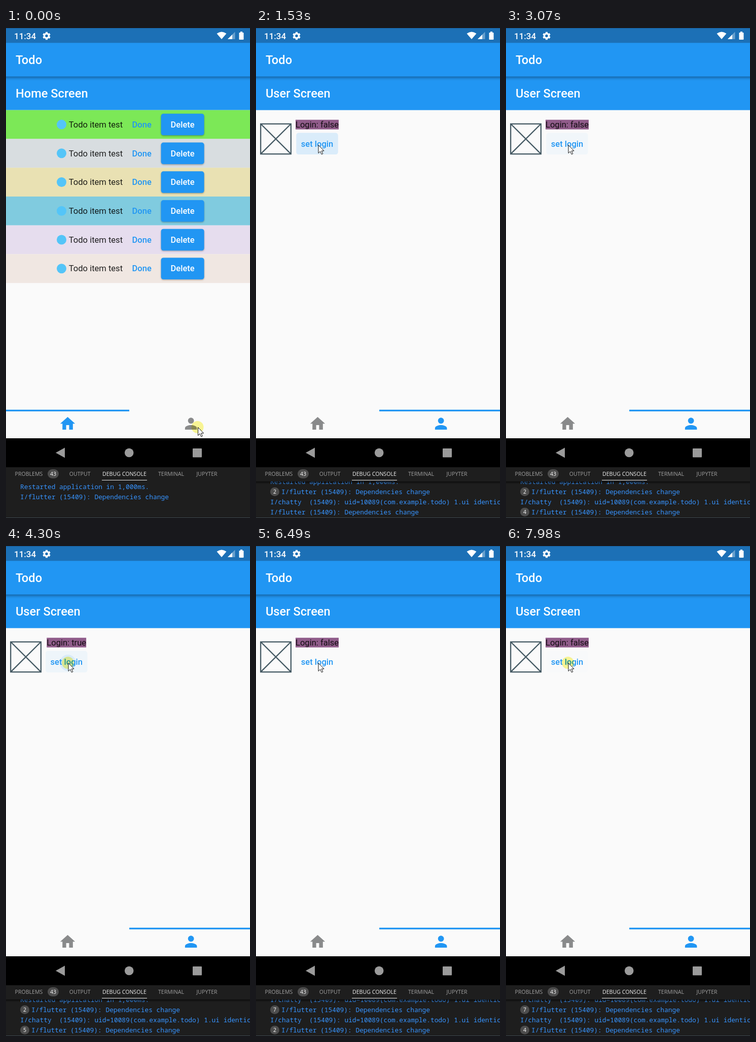
Write an HTML page with a canvas that moves like this. It is 481 px wide and 965 px high and loops after 8 s.

```html
<!DOCTYPE html>
<html lang="en">
<head>
<meta charset="utf-8">
<title>Todo</title>
<style>
html, body { margin: 0; width: 100%; height: 100%; overflow: hidden; background: #fafafa; }
canvas { display: block; width: 481px; height: 965px; }
</style>
</head>
<body>
<canvas id="stage" width="481" height="965"></canvas>
<script>
const ctx = document.getElementById('stage').getContext('2d');
const LOOP = 8000, W = 481, H = 965;
const BLUE = '#2196f3', PAGE = '#fafafa', INK = 'rgba(0,0,0,.87)';

// Device pixels per logical pixel of the phone screen.
const DP = 1.182;
const TITLE = `500 ${20 * DP}px Roboto, sans-serif`;
const BODY = `${14 * DP}px Roboto, sans-serif`;
const BUTTON = `500 ${14 * DP}px Roboto, sans-serif`;
const CLOCK = '500 17px Roboto, sans-serif';
const PANEL = '10.6px "Open Sans", sans-serif';
const MONO = '500 12.85px "Noto Sans Mono", monospace';

const rowColors = ['#7ce857', '#d8dde0', '#e9e1b3', '#80cbdf', '#e6ddee', '#f0e7e2'];
const presses = [1020, 1300, 1830, 2560, 3500, 4230, 4520, 5180, 5730, 5920, 6700, 7350, 7970];
const HOLD = 100;

// Times at which the last log line repeats, and at which a new block starts.
const repeats = [1180, 1900, 2200, 2990, 3650, 4500, 4850, 6250, 6900, 7600];
const blocks = [1500, 6060];

const homeIcon = new Path2D('M10 20v-6h4v6h5v-8h3L12 3 2 12h3v8z');
const personIcon = new Path2D('M12 12c2.21 0 4-1.79 4-4s-1.79-4-4-4-4 1.79-4 4 1.79 4 4 4zm0 2c-2.67 0-8 1.34-8 4v2h16v-2c0-2.66-5.33-4-8-4z');
const arrow = new Path2D('M.5 .5V16.5L4.2 13 6.8 18.8 9.3 17.7 6.8 12H11.6Z');

const clamp = v => Math.max(0, Math.min(1, v));
const span = (t, a, b) => clamp((t - a) / (b - a));
const ease = p => p * p * (3 - 2 * p);
const mix = (a, b, p) => a + (b - a) * p;
const blue = alpha => `rgba(33,150,243,${alpha})`;

function rect(x, y, w, h, color) {
  ctx.fillStyle = color;
  ctx.fillRect(x, y, w, h);
}

function round(x, y, w, h, r, color) {
  ctx.fillStyle = color;
  ctx.beginPath();
  ctx.roundRect(x, y, w, h, r);
  ctx.fill();
}

function disc(x, y, r, color) {
  ctx.fillStyle = color;
  ctx.beginPath();
  ctx.arc(x, y, r, 0, Math.PI * 2);
  ctx.fill();
}

function poly(color, ...pts) {
  ctx.fillStyle = color;
  ctx.beginPath();
  pts.forEach(([x, y]) => ctx.lineTo(x, y));
  ctx.fill();
}

function text(str, x, y, font, color, align = 'left') {
  ctx.font = font;
  ctx.fillStyle = color;
  ctx.textAlign = align;
  ctx.fillText(str, x, y);
}

function shadow(color, blur, dy) {
  ctx.shadowColor = color;
  ctx.shadowBlur = blur;
  ctx.shadowOffsetY = dy;
}

function scoped(draw) {
  ctx.save();
  draw();
  ctx.restore();
}

function clipTo(x, y, w, h, r = 0) {
  ctx.beginPath();
  ctx.roundRect(x, y, w, h, r);
  ctx.clip();
}

function gear(x, y) {
  scoped(() => {
    ctx.translate(x, y);
    ctx.strokeStyle = '#fff';
    ctx.lineWidth = 3.4;
    ctx.beginPath();
    ctx.arc(0, 0, 4.4, 0, Math.PI * 2);
    ctx.stroke();
    for (let i = 0; i < 6; i++) {
      rect(-2, -7.7, 4, 3.2, '#fff');
      ctx.rotate(Math.PI / 3);
    }
  });
}

function statusBar() {
  rect(0, 0, W, 29.3, '#1c70b6');
  rect(0, 0, W, 1, '#185a92');
  text('11:34', 16, 22, CLOCK, '#fff');
  gear(80, 15.5);
  ctx.fillStyle = '#fff';
  ctx.beginPath();
  ctx.moveTo(425, 22);
  ctx.lineTo(415.5, 11);
  ctx.quadraticCurveTo(425, 4, 434.5, 11);
  ctx.fill();
  poly('rgba(255,255,255,.35)', [437, 22], [451.5, 22], [451.5, 7.5]);
  poly('#fff', [437, 22], [446, 22], [446, 13]);
  round(459.5, 9, 9, 14, 1, '#fff');
  rect(462, 7, 4, 3, '#fff');
}

function appBar() {
  scoped(() => {
    shadow('rgba(0,0,0,.38)', 6, 2.2);
    rect(-10, 29, W + 20, 66.5, BLUE);
  });
  statusBar();
  text('Todo', 16 * DP, 71, TITLE, '#fff');
}

function pageTitle(str) {
  rect(0, 95, W, 66.7, BLUE);
  text(str, 16 * DP, 137, TITLE, '#fff');
}

function homePage() {
  rect(0, 95, W, 657, PAGE);
  pageTitle('Home Screen');
  rowColors.forEach((color, i) => {
    const top = 161.7 + i * 48 * DP, base = top + 34.1;
    rect(0, top, W, 48 * DP + 0.1, color);
    disc(109.5, top + 28.4, 9.5, '#54c5f8');
    text('Todo item test', 123.8, base, BODY, INK);
    text('Done', 267.7, base, BUTTON, BLUE, 'center');
    scoped(() => {
      shadow('rgba(0,0,0,.3)', 3, 1.3);
      round(305.6, top + 7.1, 85, 36 * DP, 4.7, BLUE);
    });
    text('Delete', 348.1, base, BUTTON, '#fff', 'center');
  });
}

function placeholder() {
  ctx.strokeStyle = '#455a64';
  ctx.lineWidth = 2.3;
  ctx.beginPath();
  ctx.rect(9.2, 188.8, 59.7, 59.3);
  ctx.moveTo(9.2, 188.8);
  ctx.lineTo(68.9, 248.1);
  ctx.moveTo(68.9, 188.8);
  ctx.lineTo(9.2, 248.1);
  ctx.stroke();
}

function buttonInk(x, age) {
  scoped(() => {
    clipTo(x, 206.5, 82.5, 36 * DP, 4.7);
    const fill = 0.1 * clamp(age / 140) * (1 - span(age, 430, 560));
    rect(x, 206, 84, 44, blue(fill));
    const radius = 4 + age * 0.17 + Math.max(0, age - HOLD) * 0.25;
    disc(122, 230, radius, blue(0.1 * (1 - span(age, HOLD, 350))));
  });
}

function userPage(t) {
  rect(0, 95, W, 657, PAGE);
  pageTitle('User Screen');
  placeholder();
  const on = presses.filter(p => t >= p + HOLD).length % 2 === 1;
  const center = on ? 119.2 : 120.5, width = on ? 77.8 : 85;
  rect(center - width / 2, 180.7, width, 19, '#905c8a');
  text('Login: ' + on, center, 196, BODY, INK, 'center');
  const last = presses.filter(p => t >= p).pop();
  if (t - last < 560) buttonInk(center - 41.3, t - last);
  text('set login', center, 234, BUTTON, BLUE, 'center');
}

function tabIcon(path, x, p) {
  scoped(() => {
    ctx.translate(x, 761.5);
    ctx.scale(1.47, 1.47);
    ctx.fillStyle = `rgb(${mix(137, 33, p)},${mix(138, 150, p)},${mix(139, 243, p)})`;
    ctx.fill(path);
  });
}

function tabBar(t, p) {
  rect(0, 751, W, 57, PAGE);
  if (t > 20 && t < 450) scoped(() => {
    clipTo(243, 752, 238, 56);
    disc(378, 786, 10 + t * 0.5, blue(0.08 * (1 - span(t, 150, 450))));
  });
  rect(243 * p, 751.7, 243, 3.3, BLUE);
  tabIcon(homeIcon, 103.9, 1 - p);
  tabIcon(personIcon, 347, p);
}

function navBar() {
  rect(0, 808, W, 58, '#000');
  poly('#9b9b9b', [98, 836.5], [116, 826.5], [116, 846.5]);
  disc(242.7, 836.5, 8.8, '#9b9b9b');
  round(368, 828, 18, 17.5, 1, '#9b9b9b');
}

function logLines(t) {
  const dep = 'I/flutter (15409): Dependencies change';
  const chatty = 'I/chatty  (15409): uid=10089(com.example.todo) 1.ui identical 1 line';
  const lines = [['Restarted application in 1,000ms.', 1]];
  const starts = [0, ...blocks];
  starts.forEach((start, i) => {
    if (t < start) return;
    if (i) lines.push([chatty, 1]);
    const end = Math.min(t, starts[i + 1] ?? LOOP);
    lines.push([dep, 1 + repeats.filter(r => r > start && r <= end).length]);
  });
  return lines;
}

function consolePanel(t) {
  rect(0, 865, W, 100, '#1e1e1e');
  const lines = logLines(t);
  const scroll = Math.max(0, lines.length * 20 - 70);
  scoped(() => {
    clipTo(0, 893, W, 70);
    lines.forEach(([str, count], i) => {
      const mid = 903.2 + i * 20 - scroll;
      if (count > 1) {
        round(28, mid - 8.5, 18, 17, 8.5, '#4d4d4d');
        text(count, 37, mid + 4, PANEL, '#fff', 'center');
      }
      text(str, count > 1 ? 50 : 28, mid + 4.6, MONO, '#3794ff');
    });
    if (scroll) {
      const fade = ctx.createLinearGradient(0, 893, 0, 898);
      fade.addColorStop(0, 'rgba(0,0,0,.6)');
      fade.addColorStop(1, 'rgba(0,0,0,0)');
      rect(0, 893, W, 5, fade);
    }
  });
  const tab = (str, x, color = '#a0a0a0') => text(str, x, 882, PANEL, color);
  tab('PROBLEMS', 17.5);
  tab('OUTPUT', 124.8);
  tab('DEBUG CONSOLE', 190, '#f0f0f0');
  tab('TERMINAL', 300);
  tab('JUPYTER', 375.5);
  round(82, 869, 22, 18, 9, '#4d4d4d');
  text('43', 93, 882, PANEL, '#fff', 'center');
  rect(189, 890, 89, 1, '#e7e7e7');
  rect(0, 964, W, 1, '#3d474d');
}

function pointer(t) {
  const a = ease(span(t, 150, 730)), b = ease(span(t, 730, 870));
  const x = mix(mix(378, 144.5, a), 122.5, b);
  const y = mix(mix(786, 190, a), 230, b);
  const pressed = t < 90 || presses.some(p => t >= p && t < p + HOLD + 10);
  scoped(() => {
    if (pressed) {
      ctx.globalCompositeOperation = 'multiply';
      disc(x - 0.5, y, 12, '#fdf996');
      ctx.globalCompositeOperation = 'source-over';
    }
    ctx.translate(x, y);
    ctx.fillStyle = '#fff';
    ctx.fill(arrow);
    ctx.strokeStyle = '#111';
    ctx.lineWidth = 1;
    ctx.stroke(arrow);
  });
}

function draw(t) {
  ctx.clearRect(0, 0, W, H);
  const slide = ease(span(t, 90, 400));
  scoped(() => {
    ctx.translate(-W * slide, 0);
    if (slide < 1) homePage();
    ctx.translate(W, 0);
    if (slide > 0) userPage(t);
  });
  appBar();
  tabBar(t, slide);
  navBar();
  consolePanel(t);
  pointer(t);
}

function tick() {
  draw(performance.now() % LOOP);
  requestAnimationFrame(tick);
}
tick();
</script>
</body>
</html>
```
